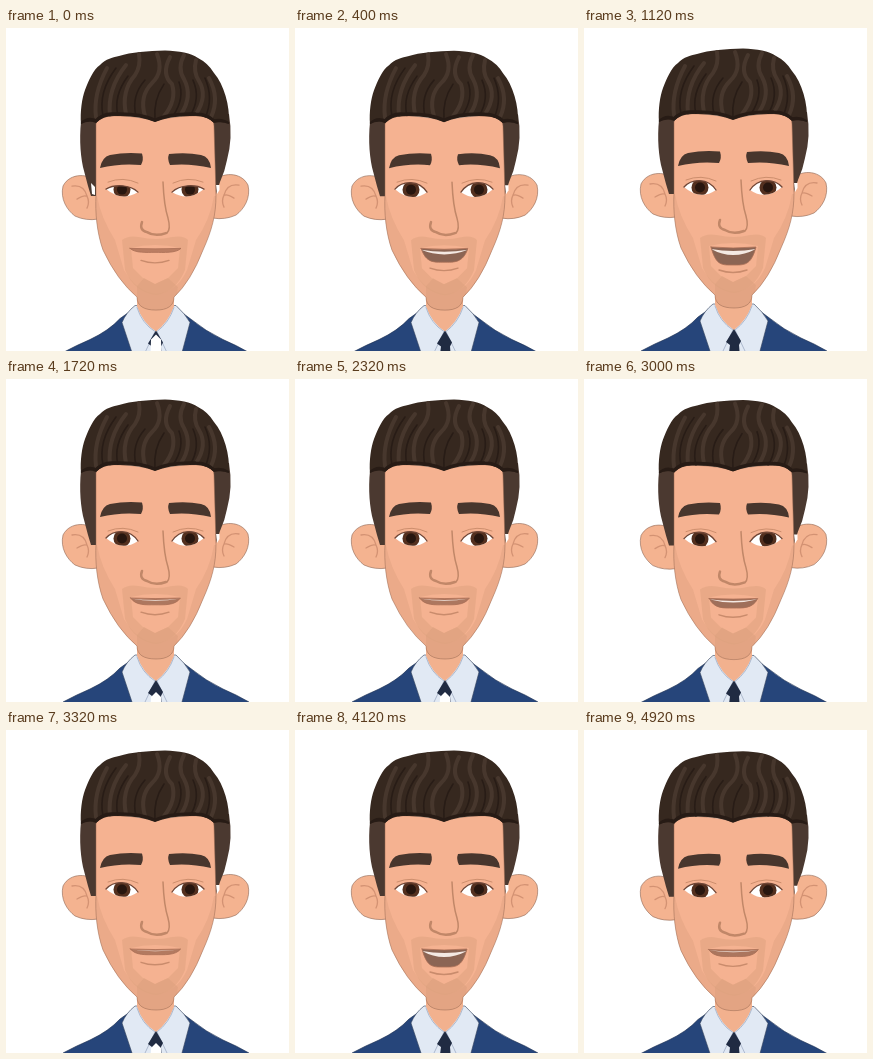
Recreate the animation shown at these times as an HTML page. Size 283x323 px, loop 5 s.

```html
<!DOCTYPE html>
<html lang="en">
<head>
<meta charset="utf-8">
<title>Talking man</title>
<style>
html, body { margin: 0; width: 100%; height: 100%; overflow: hidden; background: #fff; }
svg { display: block; width: 100vw; height: 100vh; }
.line { fill: none; stroke-linecap: round; stroke-linejoin: round; }
</style>
</head>
<body>
<svg viewBox="0 0 283 323">
  <defs>
    <clipPath id="eyeL"><path id="slitL"/></clipPath>
    <clipPath id="eyeR"><path id="slitR"/></clipPath>
    <clipPath id="lips"><path id="lipClip"/></clipPath>
    <clipPath id="face"><path id="facePath" d="M90 100V94Q91 86 99 86C117 85 136 87 149 91 162 87 181 85 201 86Q208 87 208 96L210 165C210 185 206 200 197 220Q185 251 168 267C168 276 161 280 150 280 138 280 131 276 131 267Q111 250 97 220C91 203 89 183 90 165Z"/></clipPath>
    <clipPath id="hair"><path id="hairPath" d="M75 94C74 82 76 68 79 60 83 50 87 40 94 35 99 29 108 27 113 26 125 22 142 21 159 20.5 173 21 185 23 192 28Q202 33 208 43C218 55 224 75 223 94Q216 91 208 93 201 86 190 86 165 85 149 92 133 85 108 86 97 86 90 93 82 90 75 94Z"/></clipPath>
  </defs>

  <g id="body">
    <path fill="#26457a" stroke="#17294a" stroke-width=".6" d="M57 323Q70 316 84 310 103 301 114 289L131 277H168L184 289Q200 302 217 310 231 316 243 323V340H57Z"/>
    <path fill="#e1e9f4" stroke="#35425c" stroke-width=".6" d="M129 276Q120 283 116 293L126 323V340H176V323L184 293Q179 284 170 276Z"/>
    <path fill="#f2b18e" d="M131 262H168V277Q162 293 150 302 137 294 131 277Z"/>
    <path class="line" stroke="#a9b5ca" stroke-width=".9" d="M131 278Q136 294 149 302L139 323M168 278Q163 293 151 302L161 323"/>
    <path fill="#202b42" d="M150 301L142 314 146 317 143 340H157L155 317 157 313Z"/>
    <path id="gap" fill="#fff"/>
  </g>

  <g id="head">
    <g id="ear">
      <path fill="#f4b390" stroke="#8d6552" stroke-width=".6" d="M92 153C84 143 64 142 57 156 54 169 61 180 69 186Q80 191 92 189Z"/>
      <path class="line" stroke="#d39273" stroke-width="1.3" d="M66 156Q78 154 81 166 84 172 81 178M71 169Q78 165 80 166"/>
    </g>
    <use href="#ear" transform="matrix(-1 0 0 1 299 -1)"/>

    <path fill="#4b3930" d="M76 84C73 104 74 122 77 137L82 156 85 166H94V84H204V164H210L214 152Q219 141 221 130 227 108 223 84Z"/>
    <use href="#facePath" fill="#f5b291"/>
    <path fill="#fff" d="M210 155H213.5V160L211 164Z"/>
    <path id="leftGap" fill="#fff" d="M85 153L89 157V165L86 164Z"/>

    <g clip-path="url(#face)" fill="#dda17e">
      <path opacity=".45" d="M88 166H91Q95 188 109 210L118 240Q131 262 150 264 171 262 181 240L190 210Q204 190 208 166H212V285H88Z"/>
      <path opacity=".5" fill-rule="evenodd" d="M116 210Q122 205 133 207 150 211 166 207 178 205 182 210L179 240Q170 262 150 265 128 262 119 240ZM125 218Q149 212 174 218L172 238 162 248 149 254 137 248 127 238Z"/>
      <path opacity=".55" d="M131 256L138 248 149 254 162 248 172 257 168 285H131Z"/>
    </g>
    <use href="#facePath" class="line" stroke="#946650" stroke-width=".5"/>

    <use href="#hairPath" fill="#36281f"/>
    <g clip-path="url(#hair)" class="line">
      <g stroke="#47372d" stroke-width="4">
        <path d="M90 87Q87 64 101 38M104 85Q101 59 120 35M120 84Q115 61 129 45 135 36 133 24M139 86Q133 66 146 53 158 42 151 24"/>
        <path d="M158 86Q171 70 166 54 155 44 164 27M175 84Q187 66 178 49 171 38 178 25M190 84Q202 66 193 51 187 42 190 30M205 87Q214 68 203 48"/>
      </g>
      <path stroke="#281c16" stroke-width="1.6" d="M97 86Q92 62 110 38M112 86Q107 66 122 46M130 86Q125 66 139 50M149 90Q147 70 158 54M167 86Q179 68 173 52M184 86Q195 68 187 50M199 88Q208 68 199 48"/>
      <path stroke="#271b15" stroke-width="3.5" d="M75 94Q82 87 90 91 97 83 108 84 133 83 149 90 165 83 190 84 201 84 208 91 216 89 223 94"/>
    </g>

    <path class="line" stroke="#c18768" stroke-width="1.5" d="M157 152Q158 176 162 188 165 199 161 203"/>
    <path class="line" stroke="#c18768" stroke-width="2.5" d="M136 192Q133 200 141 202 149 207 160 203"/>
    <path fill="#48362d" d="M94 138Q96 127 104 125 119 122 136 123.5 138 130 135 135 114 133 94 138ZM163 124Q181 122 195 125 204 127 205 138 184 133 164 135 161 129 163 124Z"/>

    <g clip-path="url(#eyeL)">
      <path fill="#fff" d="M98 146H136V174H98Z"/>
      <circle cx="116" cy="159.5" r="8.5" fill="#54301f"/>
      <circle cx="116" cy="159.5" r="5" fill="#28160f"/>
    </g>
    <g clip-path="url(#eyeR)">
      <path fill="#fff" d="M164 146H202V174H164Z"/>
      <circle cx="184" cy="159.5" r="8.5" fill="#54301f"/>
      <circle cx="184" cy="159.5" r="5" fill="#28160f"/>
    </g>
    <path id="lids" class="line" stroke="#704636" stroke-width="1.3"/>
    <path class="line" stroke="#cd8e6d" d="M102 152Q117 146 132 153M167 153Q182 146 197 152"/>

    <g id="mouth">
      <path id="lipFill"/>
      <path id="teeth" fill="#f4e9e3" clip-path="url(#lips)"/>
      <path id="lipLine" class="line" stroke="#aa6f56" stroke-width=".8"/>
      <path id="chin" class="line" stroke="#c98b6c" stroke-width="1.4"/>
    </g>
  </g>
</svg>
<script>
const LOOP = 5000;
// time in ms, how far the mouth is open
const speech = [
  [0, 0], [200, .1], [400, .7], [600, .35], [800, .9], [920, .3], [1120, 1],
  [1320, .4], [1520, .85], [1720, .2], [1920, .9], [2120, .7], [2320, .2],
  [2520, .1], [2720, 0], [2920, .2], [3120, .7], [3320, .12], [3520, .8],
  [3720, .4], [3920, .7], [4120, 1], [4320, .4], [4520, .8], [4720, .5],
  [4920, .22], [5000, 0]
];
const el = id => document.getElementById(id);
const set = (id, name, value) => el(id).setAttribute(name, value);
const clamp = x => Math.max(0, Math.min(1, x));
const smooth = x => { x = clamp(x); return x * x * (3 - 2 * x); };

function lerpKeys(keys, t) {
  const i = keys.findIndex(k => k[0] > t);
  const [t0, a] = keys[i - 1], [t1, b] = keys[i];
  return a + (b - a) * (t - t0) / (t1 - t0);
}

function drawEyes(open) {
  const top = 165 - 15 * open, low = 167 + 3 * open;
  const upper = (x, a, b) => `M${x} ${a}C${x + 8} ${top} ${x + 24} ${top} ${x + 32} ${b}`;
  const slit = (x, a, b) => `${upper(x, a, b)}Q${x + 16} ${low + 3} ${x} ${a}Z`;
  set('slitL', 'd', slit(100, 159, 162));
  set('slitR', 'd', slit(166, 162, 159));
  set('lids', 'd', upper(100, 159, 162) + upper(166, 162, 159));
}

function drawMouth(open) {
  const low = 223 + 14 * open, left = 124 + 3 * open, right = 299 - left;
  const shape = `M${left} 219Q149 ${220 + open} ${right} 219C${right - 5} ${low + 1} ${157 + 3 * open} ${low} 149 ${low}S${left + 5} ${low + 1} ${left} 219Z`;
  const mix = (a, b) => a + (b - a) * clamp(open * 1.5);
  set('lipFill', 'd', shape);
  set('lipFill', 'fill', `rgb(${mix(187, 140)} ${mix(126, 101)} ${mix(99, 84)})`);
  set('lipClip', 'd', shape);
  set('teeth', 'd', `M${left} ${219 + 2 * open}Q149 ${222 + 3 * open} ${right} ${219 + 2 * open}Q149 ${222 + 11 * open} ${left} ${219 + 2 * open}Z`);
  set('lipLine', 'd', shape);
  const y = 231 + 11 * open;
  set('chin', 'd', `M135 ${y}Q149 ${y + 5} 163 ${y}`);
}

function draw(now) {
  // steps of 120 and 80 ms in turn
  const ms = now % LOOP;
  const t = ms - ms % 200 + (ms % 200 >= 120 ? 120 : 0);
  const phase = (t + 160) % 2500;
  const nod = smooth(phase / 300) * (1 - smooth((phase - 400) / 350));
  const blink = 1 - clamp(Math.abs(phase - 250) / 130);
  const open = lerpKeys(speech, t);

  set('head', 'transform', `translate(0 ${3.8 * nod})`);
  set('mouth', 'transform', `translate(0 ${-1.3 * nod})`);
  set('body', 'transform', `translate(0 ${2.8 * nod})`);
  drawEyes(1 - .9 * blink);
  drawMouth(open);
  const top = open < .1 ? 305 : 313;
  set('gap', 'd', open < .21 ? `M150 ${top}L155 ${top + 5} 156 340H144L145 ${top + 5}Z` : '');
  set('leftGap', 'visibility', blink > .2 ? 'visible' : 'hidden');
}

const start = performance.now();
function tick() {
  draw(performance.now() - start);
  requestAnimationFrame(tick);
}
tick();
</script>
</body>
</html>
```
